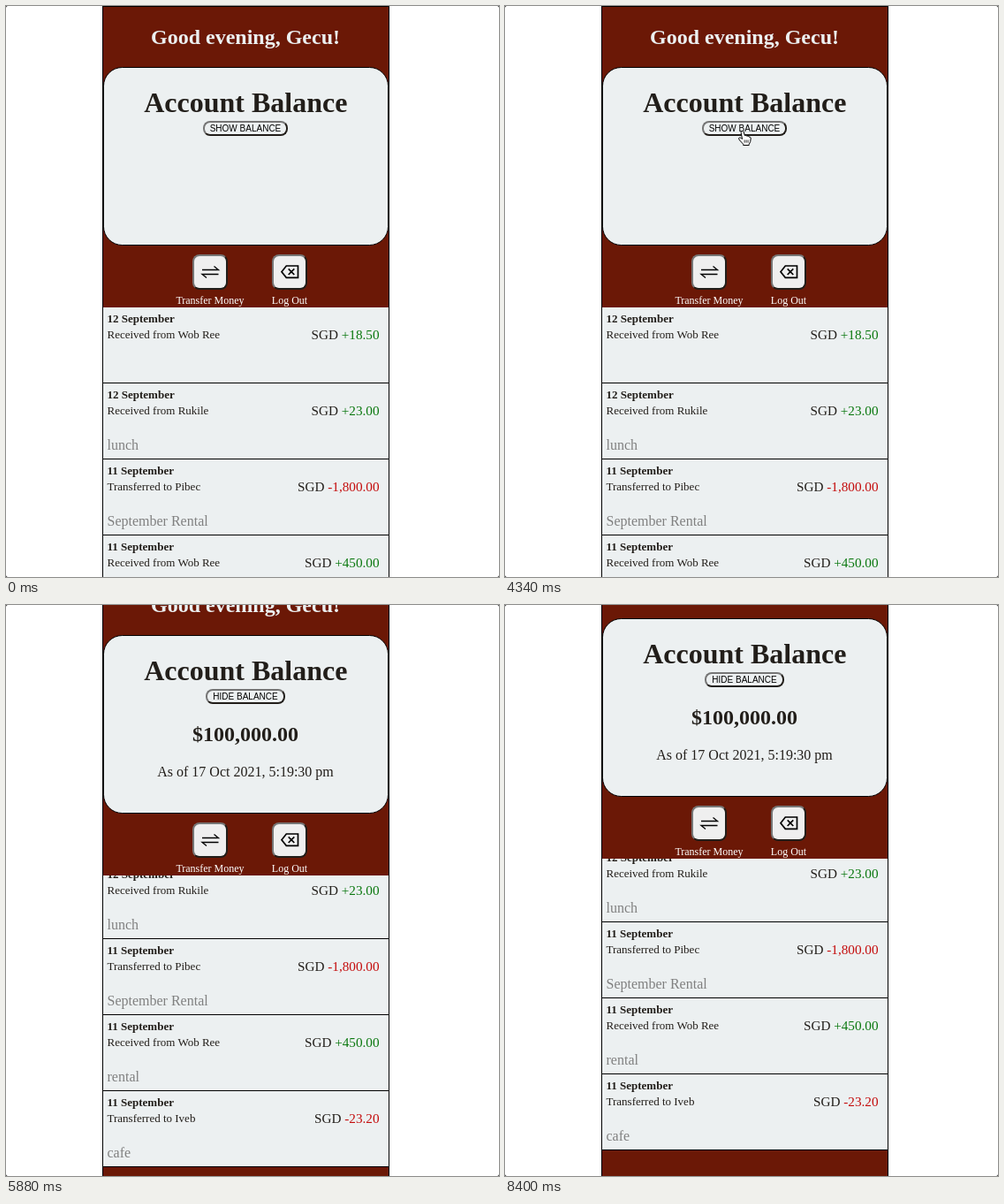
An HTML page for the animation above (9730 ms loop, 558x646 px).

```html
<!DOCTYPE html>
<html lang="en">
<head>
<meta charset="utf-8">
<title>Account balance</title>
<style>
  html, body { margin: 0; width: 100%; height: 100%; overflow: hidden; background: #000; }
  svg { display: block; }
  #stage { border-radius: 2px; background: #fff; }
  text { font: 16px "Liberation Serif", "Times New Roman", serif; fill: #221e1a; }
  .mid { text-anchor: middle; }
  .h1 { font-size: 32px; font-weight: bold; }
  .h2 { font-size: 24px; font-weight: bold; }
  .light { fill: #ecf0f1; }
  .label { font-size: 12px; fill: #fff; }
  .date { font-size: 13px; font-weight: bold; }
  .who { font-size: 13px; }
  .sum { font-size: 15.2px; text-anchor: end; }
  .in { fill: #0a780f; }
  .out { fill: #c40c0c; }
  .note { fill: #808080; }
  .btn {
    box-sizing: border-box; margin: 0 auto; border: 2px solid;
    border-color: #767676 #221e1a #221e1a #767676; border-radius: 8px; background: #efefef;
  }
  #toggle {
    width: max-content; height: 17px; padding: 0 6px; color: #000; background: #ecf0f1;
    font: 10px/13px "Liberation Sans", Arial, sans-serif; white-space: nowrap;
  }
  .icon { width: 40px; height: 40px; }
  .line { fill: none; stroke: #000; }
</style>
</head>
<body>
<svg id="stage" width="558" height="646">
  <g id="page">
    <rect x="109.5" y=".5" width="324" height="720" fill="#6b1806" stroke="#000"/>
    <text class="h2 mid light" x="271" y="43">Good evening, Gecu!</text>
    <rect x="110.5" y="69.5" width="322" height="201" rx="21" fill="#ecf0f1" stroke="#000"/>
    <text class="h1 mid" x="271.3" y="120">Account Balance</text>
    <foreignObject x="171" y="130" width="200" height="18"><div id="toggle" class="btn"></div></foreignObject>
    <g id="balance">
      <text class="h2 mid" x="271" y="189">$100,000.00</text>
      <text class="mid" x="271" y="229">As of 17 Oct 2021, 5:19:30 pm</text>
    </g>
    <foreignObject x="211" y="281" width="40" height="40"><div class="btn icon"></div></foreignObject>
    <foreignObject x="301" y="281" width="40" height="40"><div class="btn icon"></div></foreignObject>
    <path class="line" stroke-width="1.3" d="M222 298.5H240.5L235.5 294.5M240.5 303.5H222L227 307.5"/>
    <path class="line" stroke-width="1.7" d="M317.3 294H330.5V307.4H317.3L312 300.7ZM319.7 297.4l6.6 6.6m0-6.6l-6.6 6.6"/>
    <text class="label mid" x="231" y="337">Transfer Money</text>
    <text class="label mid" x="321" y="337">Log Out</text>
    <svg x="110" y="341" width="323" height="330">
      <rect width="323" height="330" fill="#ecf0f1"/>
      <g id="list"></g>
    </svg>
  </g>
  <g id="cursor" stroke="#000" stroke-linejoin="round">
    <path fill="#fff" d="M4 1.5C5 .6 6.3 1 6.6 2.2L7.6 6C8.6 5.6 9.6 5.8 10 6.7 11 6.3 12 6.6 12.3 7.6 13.6 7.3 14.6 8 14.5 9.5L14 13 12.5 16V17H6V15.8L2 11.5C.5 9.8 .6 8.8 1.6 8.5 2.6 8.2 3.6 9 4.8 10L3.5 3C3.4 2.3 3.5 1.9 4 1.5Z"/>
    <path fill="none" stroke-width=".8" d="M7.4 11v3.2M9.4 11v3.2M11.4 11v3.2"/>
  </g>
</svg>
<script>
const LOOP = 9730, STEP = 70;
const $ = id => document.getElementById(id);

const entries = [
  ["12 September", "Received from Wob Ree", "+18.50", ""],
  ["12 September", "Received from Rukile", "+23.00", "lunch"],
  ["11 September", "Transferred to Pibec", "-1,800.00", "September Rental"],
  ["11 September", "Received from Wob Ree", "+450.00", "rental"],
  ["11 September", "Transferred to Iveb", "-23.20", "cafe"]
];
$("list").innerHTML = entries.map(([date, who, sum, note], i) => `
  <g transform="translate(0 ${i * 86})">
    <text class="date" x="4.5" y="17">${date}</text>
    <text class="who" x="4.5" y="35">${who}</text>
    <text class="sum" x="312.5" y="36">SGD <tspan class="${sum[0] === "+" ? "in" : "out"}">${sum}</tspan></text>
    <text class="note" x="4.5" y="75">${note}</text>
    <rect y="85" width="323" height="1"/>
  </g>`).join("");

// Each move: start time, then one position per step.
const listMoves = [
  [5110, 1, 14, 45, 78, 95, 100],
  [6650, 99, 84, 52, 22, 5, 0],
  [8120, 8, 40, 76, 95, 100]
];
const pageMoves = [[5810, 10, 35, 50, 54]];

function position(moves, t) {
  let pos = 0;
  for (const [start, ...stops] of moves)
    if (t >= start) pos = stops[Math.min(stops.length - 1, Math.floor((t - start) / STEP))];
  return pos;
}

function draw(now) {
  const t = now % LOOP;
  const shown = t >= 4480;
  $("page").setAttribute("transform", `translate(0 ${-position(pageMoves, t)})`);
  $("list").setAttribute("transform", `translate(0 ${-position(listMoves, t)})`);
  $("balance").style.display = shown ? "" : "none";

  const label = shown ? "HIDE BALANCE" : "SHOW BALANCE";
  if ($("toggle").textContent !== label) $("toggle").textContent = label;
  $("toggle").style.opacity = t < 2730 || t >= 4340 ? 1 : t < 2800 ? .85 : .7;

  const glide = Math.min(1, Math.max(0, (t - 1120) / 490));
  const off = t < 1890 ? 2 + 6 * (1 - glide) ** 2 : 0;
  $("cursor").style.display = t >= 1120 && !shown ? "" : "none";
  $("cursor").setAttribute("transform", `translate(${263.7 + off} ${140.5 + off})`);
}

const begin = performance.now();
function tick() {
  draw(performance.now() - begin);
  requestAnimationFrame(tick);
}
tick();
</script>
</body>
</html>
```
